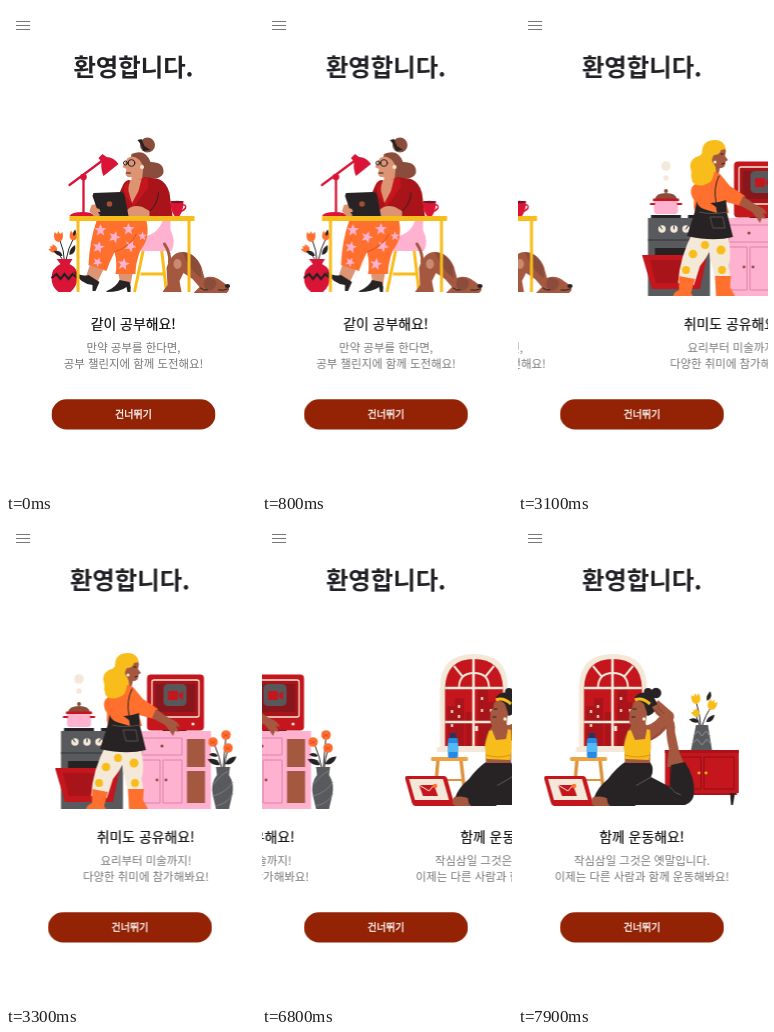
Write an HTML page that moves like this. It is 250 by 485 pixels and loops after 8000 ms.

```html
<!DOCTYPE html>
<html lang="ko">
<head>
<meta charset="utf-8">
<title>환영합니다</title>
<style>
html, body { margin: 0; width: 100%; height: 100%; overflow: hidden; background: #fff; }
svg { display: block; width: 250px; height: 485px; }
text { font-family: "Noto Sans CJK KR", "Noto Sans CJK", "Noto Sans CJK JP", sans-serif; text-anchor: middle; }
.title { font-size: 24.4px; font-weight: 700; fill: #222226; }
.head { font-size: 13.9px; fill: #111; stroke: #111; stroke-width: .2; }
.body { font-size: 11.45px; fill: #777; }
.skip { font-size: 10px; fill: #fff; stroke: #fff; stroke-width: .3; }
.r { fill: #c4161c } .m { fill: #a81419 } .d { fill: #272325 } .y { fill: #f8bd1b }
.o { fill: #ff702f } .p { fill: #ffb1d0 } .b { fill: #a3583f } .c { fill: #f4e9d9 }
.g { fill: #595a5d } .t { fill: #dd9472 } .h { fill: #8a4c3b } .k { fill: #d91437 }
.line { fill: none; stroke: #272325; stroke-width: 1; stroke-linecap: round; }
.page { animation: settle 8s step-end infinite; }
.track { animation: swipe 8s step-end infinite; }
@keyframes settle {
  0% { transform: translateX(3.5px) }
  1.25% { transform: translateX(1.8px) }
  2.5% { transform: translateX(.9px) }
  3.75% { transform: translateX(.4px) }
  5%, 100% { transform: none }
}
@keyframes swipe {
  0% { transform: none }
  35% { transform: translateX(-8px) }
  36.25% { transform: translateX(-40px) }
  37.5% { transform: translateX(-95px) }
  38.75% { transform: translateX(-166px) }
  40% { transform: translateX(-217px) }
  41.25% { transform: translateX(-241px) }
  42.5% { transform: translateX(-251px) }
  43.75% { transform: translateX(-255.5px) }
  45% { transform: translateX(-257px) }
  85% { transform: translateX(-397px) }
  86.25% { transform: translateX(-455px) }
  87.5% { transform: translateX(-487px) }
  88.75% { transform: translateX(-503px) }
  90% { transform: translateX(-510px) }
  91.25% { transform: translateX(-513px) }
  92.5%, 100% { transform: translateX(-514px) }
}
</style>
</head>
<body>
<svg viewBox="0 0 250 485">
<defs>
  <path id="star" d="M0-6 1.7-2 6-1.8 2.6 1 3.7 5.4 0 3-3.7 5.4-2.6 1-6-1.8-1.7-2Z"/>
  <path id="leaf" d="M0 0Q-5-4-3-11 4-6 0 0Z"/>
  <path id="tulip" d="M-4-5-1.5-3 0-6 1.5-3 4-5Q6 4 0 5-6 4-4-5Z"/>
  <g id="bloom"><circle r="4.8"/><path d="M-3-2 0 1 3-2M-3 2 0 0 3 3" fill="none" stroke="#d9472b" stroke-width=".9"/></g>
</defs>

<path d="M10 15.500H24M10 19.500H24M10 23.500H24" stroke="#777" stroke-width="1.2"/>

<g class="page">
<text class="title" x="124" y="69.5">환영합니다.</text>

<g class="track">
<!-- study -->
<g>
  <!-- flowers -->
  <path class="line" d="M55 256Q55 245 50 233M56 256Q58 243 65 230M54 256Q51 248 44 244"/>
  <use href="#tulip" class="o" x="49" y="231"/>
  <use href="#tulip" class="o" transform="translate(64 230) rotate(14) scale(.9)"/>
  <use href="#tulip" class="o" transform="translate(44 243) rotate(-50) scale(.8)"/>
  <use href="#leaf" class="d" transform="translate(60 249) rotate(45)"/>
  <use href="#leaf" class="d" transform="translate(53 250) rotate(-45) scale(.9)"/>
  <use href="#leaf" class="d" transform="translate(64 230) rotate(30) scale(.6)"/>
  <path class="k" d="M47 253H63L60 258Q70 263 68 273 67 281 61 286H49Q42 281 42 272 42 262 51 258Z"/>
  <path d="M42 272 47 268 51 273 55 268 59 273 63 268 68 272" fill="none" stroke="#272325" stroke-width="2.2"/>

  <!-- chair and dog -->
  <path d="M134 243 125 286M152 243 157 286M131 268H154" stroke="#f8bd1b" stroke-width="3" fill="none"/>
  <path class="p" d="M132 231Q148 229 153 215H161V224Q167 236 162 245H126Z"/>
  <path d="M160 256Q161 247 155 238" fill="none" stroke="#a3583f" stroke-width="3" stroke-linecap="round"/>
  <path class="b" d="M157 262Q162 245 174 246 186 247 192 261L195 272Q202 269 209 273L219 280Q221 284 217 287H184L190 281 183 273 174 267 170 275 172 286H153L158 279Z"/>
  <path class="h" d="M173 246Q185 247 191 260L192 272Q180 265 173 246ZM197 272Q207 271 207 278 203 288 196 283 192 276 197 272Z"/>
  <ellipse cx="168" cy="258" rx="4" ry="5" fill="#c98a70"/>
  <ellipse class="d" cx="218" cy="280" rx="2.600" ry="2"/>
  <path class="line" stroke-width=".7" d="M209 284Q214 285 218 283M191 282Q194 285 198 284"/>

  <!-- legs -->
  <path class="t" d="M82 254 96 259 88 276 85 279 76 272ZM108 262H124L121 279H111Z"/>
  <path class="d" d="M64 265Q72 271 79 269L90 276 86 285 83 285 83 279Q71 278 64 265ZM97 285Q107 281 110 274L120 276Q122 281 121 286H118L117 281Q111 286 97 286Z"/>
  <path class="o" d="M87 215H137Q141 232 131 244 126 257 126 268H106Q108 257 105 246 100 256 97 265L79 259Q80 235 87 215Z"/>
  <g class="p">
    <use href="#star" x="91" y="224"/><use href="#star" transform="translate(105 231) rotate(20)"/>
    <use href="#star" transform="translate(89 241) rotate(12)"/><use href="#star" x="119" y="223"/>
    <use href="#star" transform="translate(121 240) rotate(28)"/><use href="#star" transform="translate(114 258) rotate(10)"/>
    <use href="#star" transform="translate(88 256) rotate(30) scale(.8)"/><use href="#star" transform="translate(133 230) scale(.75)"/>
  </g>
  <path d="M105 246Q121 240 127 228" fill="none" stroke="#cf4b20" stroke-width=".8"/>

  <!-- woman -->
  <path class="h" d="M122 148Q136 142 141 156 155 156 154 167 150 175 137 172L123 173 120 159Z"/>
  <ellipse class="h" cx="138" cy="139" rx="7.500" ry="7.500"/>
  <path class="d" d="M131 138 128 134 132 133 135 140 141 144 134 145Z"/>
  <path class="t" d="M118 152Q124 148 130 154L134 160 132 178 122 178 122 171Q116 172 116 167L117 163 113 161Z"/>
  <path class="line" stroke-width=".7" d="M117 157H119M117 167 121 167"/>
  <circle class="line" stroke-width=".9" cx="122" cy="157" r="3.400"/><circle class="line" stroke-width=".9" cx="116" cy="157" r="2"/>
  <circle class="c" cx="132.500" cy="161" r="2"/>
  <path class="m" d="M119 174Q128 176 135 171L149 173Q157 176 160 187L163 210H106L107 194 113 180Q115 175 119 174Z"/>
  <path class="t" d="M121 174 134 173 130 184 123 198 117 186Z"/>
  <path class="r" d="M132 173 138 171 139 181 124 201 122 198 129 185ZM119 174 114 181 116 190 123 199 119 185Z"/>
  <path class="line" stroke="#7f0e13" d="M124 201 126 209M149 187Q148 200 139 206"/>
  <path class="t" d="M117 205Q122 198 133 201L140 205V210H117Z"/>

  <!-- lamp and desk -->
  <path d="M74 207V171M60 179 95 153" fill="none" stroke="#d91437" stroke-width="2.300" stroke-linecap="round"/>
  <circle class="k" cx="74" cy="171" r="3.300"/>
  <path class="k" d="M60 210Q62 206 73 206 83 206 85 210Z"/>
  <path class="k" d="M89 152 93 148 97 151Q104 151 109 158L94 170Q91 163 92 156Z"/>
  <path class="t" d="M82 199 87 198 91 210 85 211 80 205Z"/>
  <path class="d" d="M84 187 111 186Q114 186 115 189L119 210H90L83 190Z"/>
  <path class="t" d="M83 201 90 203 91 206 86 206 91 209 85 211Z"/>
  <circle cx="100" cy="198" r="2.800" fill="#a3502f"/>
  <path class="k" d="M161 195H174Q174 205 170 210H165Q161 205 161 195Z"/>
  <path d="M172 199Q177 198 176 202 174 205 171 205" fill="none" stroke="#d91437" stroke-width="1.500"/>
  <ellipse cx="167.500" cy="196" rx="6.500" ry="1.200" fill="#6f1a1f"/>
  <path class="y" d="M60 210H185V215H181V286H178V215H70V286H67V215H60Z"/>

  <text class="head" x="123.700" y="322.600">같이 공부해요!</text>
  <text class="body" x="124" y="345.500">만약 공부를 한다면,</text>
  <text class="body" x="124" y="362">공부 챌린지에 함께 도전해요!</text>
</g>

<!-- hobby -->
<g transform="translate(257)">
  <!-- stove and pot -->
  <circle class="c" cx="57" cy="160" r="4.8"/><circle class="c" cx="57" cy="172" r="2.8"/>
  <path class="h" d="M46 193Q47 187 57 187 67 187 68 193Z"/>
  <circle class="h" cx="57" cy="185" r="2"/>
  <path class="p" d="M45 194H69V205Q69 208 66 208H48Q45 208 45 205Z"/>
  <path class="r" d="M44 192.500H70V195H44ZM41 197H46V199H41ZM68 197H73V199H68Z"/>
  <path class="d" d="M42 209H72V212H42ZM79 209H97V212H79Z"/>
  <path class="g" d="M39 212H101V290H39Z"/>
  <path d="M39 234H101" stroke="#3e3f42" stroke-width="1.3"/>
  <g class="c"><circle cx="53" cy="223" r="3.7"/><circle cx="65" cy="223" r="3.7"/><circle cx="77" cy="223" r="3.7"/></g>
  <path class="line" d="M53 223 51 220M65 223V220M77 223 79 220"/>
  <path class="d" d="M46 242H94V252H46Z"/>
  <path class="r" d="M33 249H98L91 283H43Z"/>
  <path class="m" d="M41 254H90L86 277H47Z"/>

  <!-- monitor -->
  <path class="d" d="M143 205H162L165 213H140Z"/>
  <rect class="r" x="125" y="155.500" width="57" height="56" rx="4"/>
  <rect x="130" y="161" width="47" height="37" rx="2" fill="#a81419" stroke="#f4e9d9" stroke-width="1.3"/>
  <path class="d" d="M134 165H173V193H134Z" opacity=".25"/>
  <rect x="141.500" y="165" width="23" height="22" rx="4.5" fill="#58585b"/>
  <path class="r" d="M146 172H156V181H146ZM157 175 161 172V181L157 178Z"/>
  <circle class="c" cx="171" cy="205" r="1.6"/>

  <!-- counter -->
  <path class="p" d="M116 212H189V290H116Z"/>
  <path d="M120 219H160V236H120ZM120 241H138V284H120ZM141 241H160V284H141Z" fill="none" stroke="#dc83aa" stroke-width="1"/>
  <path class="b" d="M165 220H183V248H165ZM165 252H183V284H165Z"/>
  <g class="h"><circle cx="140" cy="227" r="1.6"/><circle cx="135" cy="261" r="1.4"/><circle cx="144" cy="261" r="1.4"/></g>

  <!-- vase -->
  <path class="line" d="M200 251Q198 238 192 224M201 251 204 217M202 251Q203 239 206 230"/>
  <use href="#bloom" class="o" x="191" y="223"/><use href="#bloom" class="o" x="204" y="216"/><use href="#bloom" class="o" x="206" y="229"/>
  <use href="#leaf" class="d" transform="translate(198 246) rotate(-50) scale(1.2)"/>
  <use href="#leaf" class="d" transform="translate(203 245) rotate(72) scale(1.2)"/>
  <use href="#leaf" class="d" transform="translate(196 237) rotate(-65) scale(.8)"/>
  <path class="g" d="M194 248H208L207 256Q213 265 210 277L207 290H194L191 277Q188 264 195 256Z"/>
  <path d="M191 266Q200 254 207 252M191 277Q205 273 211 263M194 287Q207 284 211 274" fill="none" stroke="#85868a" stroke-width=".8"/>

  <!-- woman -->
  <path class="c" d="M84 226H106Q104 245 91 260L85 279 69 277Q71 250 84 226ZM98 226H118Q123 244 120 260L122 276H106Q104 262 101 252Z"/>
  <g class="y"><circle cx="84" cy="248" r="4.3"/><circle cx="77" cy="264" r="4"/><circle cx="96" cy="239" r="4"/><circle cx="112" cy="244" r="4.5"/><circle cx="113" cy="264" r="4"/></g>
  <path class="o" d="M70 270 86 273 82 287 84 290H64Q65 286 70 284ZM106 270H122L121 281 126 290H107Z"/>
  <path class="b" d="M104 140Q114 135 117 145L116 150 119 154 116 156Q117 162 111 162L109 170H98L99 152Z"/>
  <path class="y" d="M117 143Q115 134 106 134 94 134 93 145 94 149 87 151 79 155 82 164 83 167 82 170 84 180 93 179 104 181 105 172 109 164 105 158 101 154 105 149 111 149 112 144Z"/>
  <circle class="c" cx="106" cy="156" r="1.5"/>
  <path class="line" stroke-width=".7" d="M112 148 114 148M113 158 116 157"/>
  <path class="o" d="M93 171Q103 163 111 168L121 180 136 190 132 200 117 196 120 207H86Q84 201 85 194 80 187 83 181Z"/>
  <path class="y" d="M84 168Q96 160 105 165 105 177 95 179 86 181 83 175Z"/>
  <path class="b" d="M134 190 147 199Q156 202 158 208L154 207 157 213 153 212 151 217 147 211 143 206 130 199Z"/>
  <path class="d" d="M88 194Q101 200 117 194L118 207 124 231Q104 236 78 230L86 205Z"/>
  <path class="line" stroke-width="2" d="M110 170Q104 182 107 196"/>
  <path d="M90 206Q102 209 118 206M101 211H114L116 222H104Z" fill="none" stroke="#65595b" stroke-width=".8"/>
  <path class="o" d="M88 185Q84 201 98 204L108 207 107 201 97 194 98 186Z"/>

  <text class="head" x="123.700" y="322.600">취미도 공유해요!</text>
  <text class="body" x="124" y="345.500">요리부터 미술까지!</text>
  <text class="body" x="124" y="362">다양한 취미에 참가해봐요!</text>
</g>

<!-- workout -->
<g transform="translate(514)">
  <!-- window -->
  <path class="c" d="M61 232V169Q61 135 95 135 129 135 129 169V232Z"/>
  <path class="r" d="M66 227V169Q67 140 95 140 123 140 124 169V227Z"/>
  <path class="m" d="M68 227V187H76V179H85V227ZM87 227V193H94V227ZM99 227V171H109V183H117V227Z"/>
  <path class="c" d="M72 191H74V194H72ZM79 186H81V189H79ZM79 196H81V199H79ZM102 178H104V181H102ZM102 190H104V193H102ZM111 190H113V193H111ZM96 207H99V212H96ZM72 205H74V208H72Z"/>
  <path d="M66 169H124M94.500 140V227M66 203H124" stroke="#f4e9d9" stroke-width="2.6"/>
  <path d="M80 169Q80 154 95 154 110 154 110 169M84 158 75 147M106 158 115 147" fill="none" stroke="#f4e9d9" stroke-width="2"/>
  <path class="c" d="M58 228H132V233H58Z"/>

  <!-- stool and bottle -->
  <path d="M59 241 55 286M82 241 87 286" stroke="#dd923d" stroke-width="3.4"/>
  <path d="M57 261H84" stroke="#dd923d" stroke-width="2"/>
  <rect fill="#eda340" x="52" y="238" width="37" height="4" rx="1.500"/>
  <rect x="69" y="219" width="10" height="20" rx="2" fill="#2589e8"/>
  <path d="M69 224H79V233H69Z" fill="#54b8f4"/>
  <path d="M71 214H77V219H71Z" fill="#29345d"/>

  <!-- cabinet and vase -->
  <path class="r" d="M147 231H221V274H147Z"/>
  <path class="m" d="M147 231H221V234H147ZM149 274H219V276H149Z"/>
  <path d="M152 238H183V270H152ZM186 238H216V270H186Z" fill="none" stroke="#8d0f14" stroke-width="1"/>
  <circle class="y" cx="181" cy="254" r="1.4"/><circle class="y" cx="188" cy="254" r="1.4"/>
  <path class="d" d="M151 274H156L155 286H153ZM212 274H217L215 286H213Z"/>
  <path class="line" d="M183 208Q182 195 178 182M184 208Q187 196 194 187M182 208 178 196"/>
  <g class="y">
    <use href="#tulip" transform="translate(178 180) rotate(-12)"/><use href="#tulip" transform="translate(194 186) rotate(25)"/>
    <use href="#tulip" transform="translate(178 194) rotate(-40) scale(.8)"/>
  </g>
  <use href="#leaf" class="d" transform="translate(188 203) rotate(65)"/>
  <use href="#leaf" class="d" transform="translate(181 203) rotate(-60) scale(.9)"/>
  <use href="#leaf" class="d" transform="translate(189 182) rotate(35) scale(.9)"/>
  <path class="g" d="M178 206H190L194 231H173Z"/>
  <path d="M176 216 180 212 184 217 188 212 192 217M174 225 179 220 184 226 189 220 193 225" fill="none" stroke="#929296" stroke-width="1"/>

  <!-- laptop -->
  <path class="r" d="M28 257H65Q67 257 68 259L75 284H86V287H36Q34 287 33 284L26 259Q26 257 28 257Z"/>
  <path class="c" d="M30 260H64L70 281H36Z"/>
  <path class="r" d="M40 266H55L59 277H44Z"/>
  <path d="M40 266 50 272 55 266" fill="none" stroke="#f4e9d9" stroke-width="1"/>
  <circle class="o" cx="56" cy="267" r="2.300"/>

  <!-- woman -->
  <path class="b" d="M149 248 151 230Q147 214 149 203L153 198Q158 203 157 213L161 232 167 247Z"/>
  <path class="d" d="M107 243H132Q137 250 133 258L152 268 153 246 167 243Q177 259 176 273 176 283 167 286H82Q75 286 76 279 79 269 90 260 98 249 107 243Z"/>
  <path d="M133 258Q120 265 105 275M152 268Q157 275 163 276" fill="none" stroke="#5c575b" stroke-width="1"/>
  <path class="b" d="M75 278Q85 276 93 281L101 287H77Q71 285 75 278Z"/>
  <path class="d" d="M92 270 117 264Q124 278 117 287H92Q86 281 92 270Z"/>
  <path class="b" d="M117 203 127 204 133 213 132 244H107L106 222Q108 211 117 203Z"/>
  <path class="b" d="M127 207Q138 205 145 192L137 186 140 181 155 194Q158 198 153 204 143 218 132 222Z"/>
  <path class="b" d="M113 207Q109 200 113 190L123 180 133 184 127 189 119 196 120 209Z"/>
  <path class="d" d="M117 178Q123 171 134 175L139 184Q139 194 130 197L120 190Z"/>
  <circle class="d" cx="138" cy="174" r="5.300"/><circle class="d" cx="130" cy="173" r="4"/>
  <path class="b" d="M115 184Q121 179 126 185L129 194 127 207H118L118 202Q113 202 113 197L111 193 114 190Z"/>
  <path d="M117 181Q124 178 132 185" fill="none" stroke="#f8bd1b" stroke-width="3"/>
  <path class="line" stroke-width=".7" d="M115 190H118M114 198 117 198"/>
  <circle class="c" cx="126" cy="200" r="1.700"/>
  <path class="b" d="M134 188Q140 183 147 188L153 197 147 202 138 195Z"/>
  <path d="M139 187 146 195M136 190 143 197M131 222Q140 216 147 208" fill="none" stroke="#7b3d2c" stroke-width=".7"/>
  <path class="y" d="M110 212 113 211 117 221 127 220 129 210 132 211 133 229 131 241 107 240 106 226Z"/>
  <path d="M107 236Q119 240 132 236" fill="none" stroke="#d69712" stroke-width="1"/>

  <text class="head" x="123.700" y="322.600">함께 운동해요!</text>
  <text class="body" x="124" y="345.500">작심삼일 그것은 옛말입니다.</text>
  <text class="body" x="124" y="362">이제는 다른 사람과 함께 운동해봐요!</text>
</g>
</g>

<rect x="42" y="393.300" width="164" height="30.200" rx="15.100" fill="#942305"/>
<text class="skip" x="124" y="412.400">건너뛰기</text>
</g>
</svg>
</body>
</html>
```
